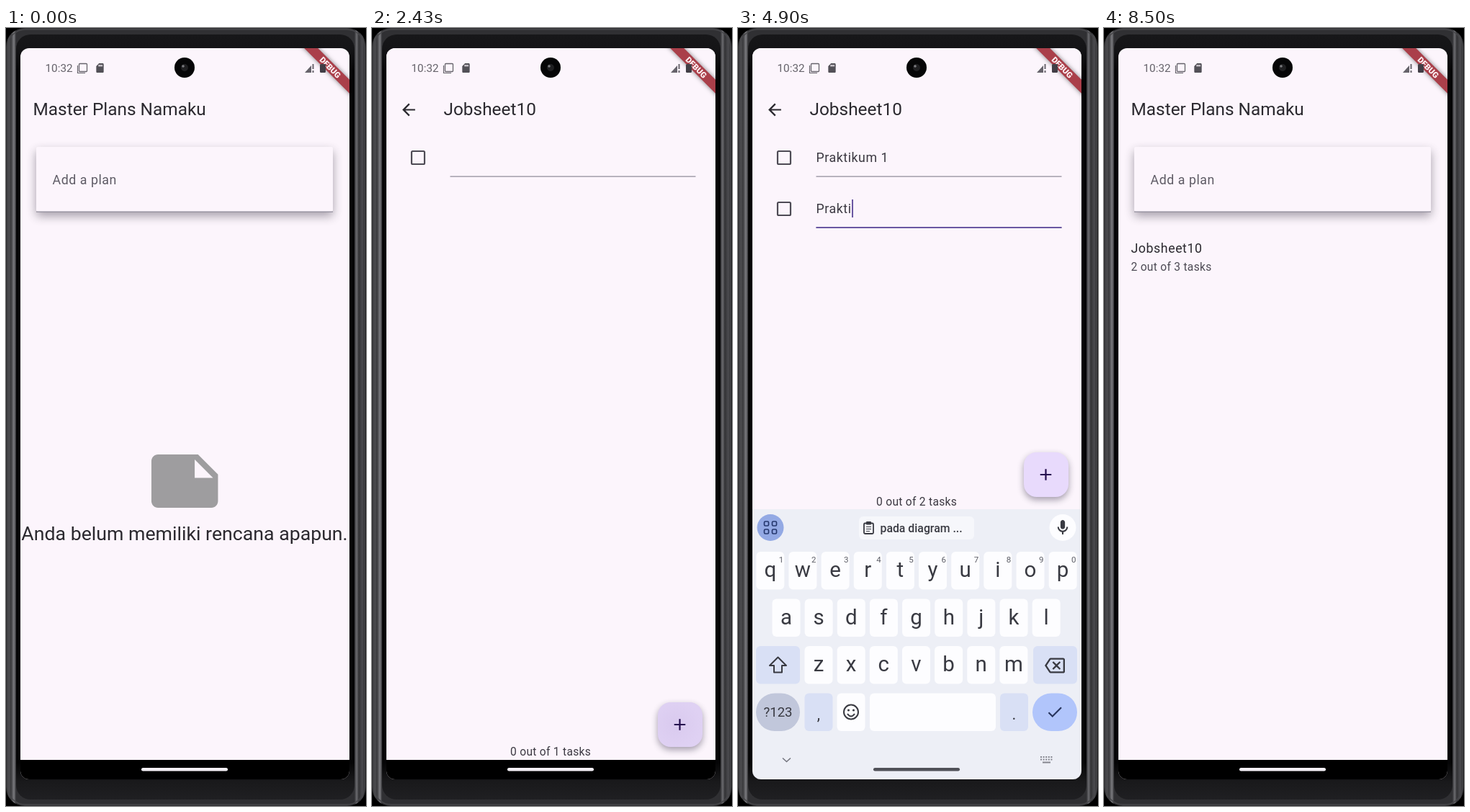
An HTML page with a canvas that plays this animation: 500x1080 px, repeating every 8530 ms.

```html
<!DOCTYPE html>
<html lang="id">
<head>
<meta charset="utf-8">
<title>Master Plans</title>
<style>
html, body { margin: 0; width: 100%; height: 100%; overflow: hidden; background: #000; }
canvas { display: block; }
</style>
</head>
<body>
<canvas id="stage" width="500" height="1080"></canvas>
<script>
const c = document.getElementById('stage').getContext('2d');
const LOOP = 8530, INK = '#2b292f', KEY_INK = '#393a42', BG = '#fcf5fc', PURPLE = '#6a58a2', GREY = '#4e4b55';

// One entry per text entry: keyboard opens, typing starts, ms per letter, focus ends, keyboard closes
const entries = [
  { open: 240, type: 600, step: 68, blur: 1330, close: 1390, text: 'Jobsheet10' },
  { open: 2580, type: 2800, step: 60, blur: 3500, close: 3560, text: 'Praktikum 1' },
  { open: 4330, type: 4540, step: 62, blur: 5290, close: 5350, text: 'Praktikum 2' },
  { open: 6200, type: 6400, step: 58, blur: 7130, close: 7230, text: 'Praktikum 3' }
];
const taskAdded = [2330, 4080, 5930], taskChecked = [7620, 7860];
const PUSH = 1740, BACK = 8130, SLIDE = 130;

const ICON = {
  note: 'M22 10l-6-6H4c-1.1 0-2 .9-2 2v12c0 1.1.9 2 2 2h16c1.1 0 2-.9 2-2v-8zM15 5.5l5.5 5.5H15z',
  back: 'M20 11H7.83l5.59-5.59L12 4l-8 8 8 8 1.41-1.41L7.83 13H20z',
  add: 'M19 13h-6v6h-2v-6H5v-2h6V5h2v6h6z',
  check: 'M9 16.17L4.83 12l-1.42 1.41L9 19 21 7l-1.41-1.41z',
  card: 'M18 2h-8L4 8v12c0 1.1.9 2 2 2h12c1.1 0 2-.9 2-2V4c0-1.1-.9-2-2-2zM9 5h2v4H9zM12 5h2v4h-2zM15 5h2v4h-2z',
  mic: 'M12 14c1.66 0 3-1.34 3-3V5c0-1.66-1.34-3-3-3S9 3.34 9 5v6c0 1.66 1.34 3 3 3zM17 11c0 2.76-2.24 5-5 5s-5-2.24-5-5H5c0 3.53 2.61 6.43 6 6.92V21h2v-3.08c3.39-.49 6-3.39 6-6.92z',
  erase: 'M22 3H7c-.69 0-1.23.35-1.59.88L0 12l5.41 8.11c.36.53.9.89 1.59.89h15c1.1 0 2-.9 2-2V5c0-1.1-.9-2-2-2zm0 16H7.07L2.4 12l4.66-7H22v14zM10.41 17L14 13.41 17.59 17 19 15.59 15.41 12 19 8.41 17.59 7 14 10.59 10.41 7 9 8.41 12.59 12 9 15.59z'
};

const clamp = v => Math.min(1, Math.max(0, v));
const ease = v => 1 - (1 - clamp(v)) ** 3;
const typed = (e, t) => e.text.slice(0, Math.max(0, Math.floor((t - e.type) / e.step) + 1));
const focused = (e, t) => t >= e.open - 30 && t < e.blur;
const count = (times, t) => times.filter(at => t >= at).length;
const progress = t => `${count(taskChecked, t)} out of ${count(taskAdded, t)} tasks`;

function box(x, y, w, h, r, fill) {
  c.beginPath();
  c.roundRect(x, y, w, h, r);
  c.fillStyle = fill;
  c.fill();
}
function disc(x, y, r, fill) {
  box(x - r, y - r, 2 * r, 2 * r, r, fill);
}
function frame(x, y, w, h, r, color, line) {
  c.beginPath();
  c.roundRect(x, y, w, h, r);
  c.strokeStyle = color;
  c.lineWidth = line;
  c.stroke();
}
function lines(d, color, width) {
  c.strokeStyle = color;
  c.lineWidth = width;
  c.stroke(new Path2D(d));
}
function text(s, x, y, size, color = INK, space = 0, align = 'left', weight = 400) {
  c.font = `${weight} ${size}px Roboto, sans-serif`;
  c.letterSpacing = space + 'px';
  c.textAlign = align;
  c.fillStyle = color;
  c.fillText(s, x, y);
  const width = c.measureText(s).width;
  c.letterSpacing = '0px';
  return width;
}
function icon(name, cx, cy, size, color) {
  c.save();
  c.translate(cx - size / 2, cy - size / 2);
  c.scale(size / 24, size / 24);
  c.fillStyle = color;
  c.fill(new Path2D(ICON[name]), 'evenodd');
  c.restore();
}
function shadow(color, blur, dy, draw) {
  c.save();
  c.shadowColor = color;
  c.shadowBlur = blur;
  c.shadowOffsetY = dy;
  draw();
  c.restore();
}
function gradient(x, y, stops) {
  const g = c.createLinearGradient(0, 0, x, y);
  for (const [at, color] of stops) g.addColorStop(at / (x || y), color);
  return g;
}

function body() {
  c.fillStyle = '#000';
  c.fillRect(0, 0, 500, 1080);
  box(0, 0, 500, 1080, 26, gradient(500, 0, [
    [0, '#242426'], [4, '#4e4e51'], [7, '#39393c'], [11, '#7c7c80'], [14, '#303033'],
    [484, '#303033'], [487, '#6c6c70'], [490, '#323235'], [495, '#4c4c50'], [500, '#18181a']]));
  frame(2, 2, 496, 1076, 25, '#47474a', 1.5);
  box(14, 9, 470, 1062, 20, gradient(0, 1080, [
    [0, '#19191b'], [30, '#141416'], [60, '#050506'], [1020, '#050506'], [1046, '#19191b'], [1080, '#222225']]));
}

function cursor(x, y, t, e) {
  if ((t - e.type + 1000) % 340 < 200) {
    c.fillStyle = PURPLE;
    c.fillRect(x, y, 2, 25);
  }
}

function underline(x, y, w, e, t) {
  box(x, y - 1, w, 1.2, 0, '#918d9b');
  c.save();
  c.globalAlpha *= clamp((t - e.open + 30) / 60) * (1 - clamp((t - e.blur) / 110));
  box(x, y - 1.5, w, 2, 0, PURPLE);
  c.restore();
}

function home(t, inset) {
  const e = entries[0], focus = focused(e, t), done = t >= 1310;
  text('Master Plans Namaku', 37.5, 121, 24.4);
  shadow('rgba(40,34,50,.42)', 14, 6, () => box(42, 165, 412, 90, 2, BG));
  underline(42, 255.5, 412, e, t);
  const up = ease((t - e.open + 30) / 80) * (1 - ease((t - e.blur) / 80));
  text('Add a plan', 64.5, 216.5 - 17 * up, 17.8 - 4.45 * up, focus ? '#7b6bae' : '#5d5a64', .55 - .14 * up);
  if (focus) {
    const w = done ? 0 : text(typed(e, t), 64.5, 226, 17.8, INK, .55);
    cursor(65 + w, 207, t, e);
  }
  if (done) {
    if (t > PUSH - 70 && t < PUSH + 200) {
      c.fillStyle = 'rgba(70,60,80,.09)';
      c.fillRect(20, 279, 457, 80);
    }
    text('Jobsheet10', 37.5, 312, 17.8, INK, .55);
    text(progress(t), 37.5, 336.5, 15.6, GREY, .28);
  } else {
    const y = -inset / 2;
    icon('note', 248.2, 629 + y, 111, '#9e9d9f');
    text('Anda belum memiliki rencana apapun.', 248, 711 + y, 26.7, INK, 0, 'center');
  }
}

function plan(t, inset) {
  c.fillStyle = BG;
  c.fillRect(20, 28, 457, 988);
  icon('back', 51, 113.5, 26.7, INK);
  text('Jobsheet10', 99.5, 121, 24.4);
  for (let i = 0; i < count(taskAdded, t); i++) {
    const e = entries[i + 1], y = 71 * i;
    if (t >= taskChecked[i]) {
      box(54, 170 + y, 20, 20, 2, '#6750a4');
      icon('check', 64, 180 + y, 19, BG);
    } else {
      frame(55, 171 + y, 18, 18, 1.5, GREY, 2.2);
    }
    const w = text(typed(e, t), 108.5, 186 + y, 17.8, '#3c3942', .55);
    underline(108.5, 206.5 + y, 341, e, t);
    if (focused(e, t)) cursor(109 + w, 167 + y, t, e);
  }
  text(progress(t), 248, 1010 - inset, 15.6, '#3c3942', .28, 'center');
  fab(t, 936 - inset);
}

function fab(t, y) {
  const tap = taskAdded.find(at => t >= at - 40 && t < at + 200);
  shadow('rgba(40,30,60,.42)', 10, 4, () => box(397, y, 62, 62, 17.8, tap ? '#dfd1f3' : '#e8dafc'));
  if (tap) {
    const p = clamp((t - tap + 40) / 200), g = c.createRadialGradient(422, y + 31, 0, 422, y + 31, 14 + 30 * p);
    g.addColorStop(0, `rgba(195,175,222,${.7 * (1 - p)})`);
    g.addColorStop(1, 'rgba(195,175,222,0)');
    box(397, y, 62, 62, 17.8, g);
  }
  icon('add', 427.5, y + 31, 26.7, '#26104f');
}

function banner() {
  c.save();
  c.translate(477, 28);
  c.rotate(Math.PI / 4);
  shadow('rgba(0,0,0,.5)', 6, 0, () => box(-60, 31, 120, 13.4, 0, '#aa3f4a'));
  text('DEBUG', 0, 41.8, 11.3, '#fff4f6', 0, 'center', 900);
  c.restore();
}

function status() {
  const color = '#66636b';
  text('10:32', 54.5, 61, 15.3, color);
  frame(101.5, 49.5, 11, 11, 1, color, 1.3);
  lines('M99.5 52V62.5H110', color, 1.2);
  icon('card', 130.5, 55.5, 15.5, '#525057');
  c.fillStyle = color;
  c.fill(new Path2D('M415 62L424 52V62ZM425.5 50h2v7h-2ZM425.5 59h2v3h-2Z'));
  box(436, 50, 8, 12, 1.5, '#423e46');
  disc(248, 55, 14, '#060607');
  disc(248, 55, 5, '#1f1f21');
  disc(246, 53, 1.8, '#7c7c80');
}

function key(x, y, w, label, fill = '#fdfdff') {
  box(x, y, w, 52.5, 6, fill);
  if (label) text(label, x + w / 2, y + 35, 29.5, KEY_INK, 0, 'center');
}

function keyboard() {
  c.fillStyle = '#edeff6';
  c.fillRect(20, 668, 457, 376);
  disc(45, 693.5, 18.5, '#93a9e4');
  for (const x of [36.5, 47.5]) for (const y of [685, 696]) frame(x, y, 6, 6, 1.5, '#26386f', 1.7);
  box(168, 678, 160, 32, 6, '#f6f7fb');
  frame(175, 687.5, 13, 14.5, 1.5, KEY_INK, 1.8);
  box(178, 685, 7, 4.5, 1, KEY_INK);
  lines('M178 692.5h7M178 695.5h7M178 698.5h5', KEY_INK, 1.2);
  text('pada diagram ...', 197.5, 699.5, 15.8, KEY_INK, 0, 'left', 500);
  disc(451, 693.5, 18.5, '#fdfdff');
  icon('mic', 451, 693.5, 25, KEY_INK);

  [...'qwertyuiop'].forEach((ch, i) => {
    key(25.3 + 45.15 * i, 727, 39, ch);
    text((i + 1) % 10, 60 + 45.15 * i, 741.5, 11.5, '#5c5d66', 0, 'center');
  });
  [...'asdfghjkl'].forEach((ch, i) => key(47.5 + 45.15 * i, 792.5, 39, ch));
  [...'zxcvbnm'].forEach((ch, i) => key(92.5 + 45.15 * i, 858, 39, ch));

  const side = '#d9e0f5';
  key(25, 858, 61, '', side);
  c.lineJoin = 'round';
  lines('M55.5 873.5L44 885H50V894.5H61V885H67Z', KEY_INK, 2);
  c.lineJoin = 'miter';
  key(410, 858, 61, '', side);
  icon('erase', 440, 885, 28, KEY_INK);

  box(25, 923.5, 61, 52.5, 26, '#c1c7db');
  text('?123', 55.5, 956, 18.6, KEY_INK, 0, 'center');
  key(92.5, 923.5, 39, '', side);
  text(',', 112, 960, 22, KEY_INK, 0, 'center');
  key(137.5, 923.5, 39);
  frame(147, 939.5, 20, 20, 10, KEY_INK, 2);
  disc(153.5, 947, 1.6, KEY_INK);
  disc(160.5, 947, 1.6, KEY_INK);
  lines('M152 952Q157 959 162 952', KEY_INK, 2);
  key(183, 923.5, 175);
  key(364, 923.5, 39, '', side);
  text('.', 383.5, 960, 22, KEY_INK, 0, 'center');
  box(409, 923.5, 62, 52.5, 26, '#b1c5fb');
  icon('check', 440, 949.5, 26, '#29365f');

  lines('M62 1013.5L67.5 1018.5L73 1013.5', '#75767f', 1.6);
  for (let i = 0; i < 5; i++) for (let j = 0; j < 2; j++) box(420 + 3.6 * i, 1011 + 3.5 * j, 2, 2, 0, '#85868f');
  box(423, 1018.5, 11, 2, 0, '#85868f');
}

function draw(t) {
  const open = Math.max(...entries.map(e => ease((t - e.open) / SLIDE) * (1 - ease((t - e.close) / SLIDE))));
  const top = 1043 - 375 * open, inset = Math.max(0, 1015 - top);
  body();
  c.save();
  c.beginPath();
  c.roundRect(20, 28, 457, 1015, 12);
  c.clip();
  c.fillStyle = BG;
  c.fillRect(20, 28, 457, 1015);

  const page = ease((t - PUSH) / 130) * (1 - ease((t - BACK) / 130));
  if (page < 1) home(t, inset);
  if (page > 0) {
    const s = .9 + .1 * page;
    c.save();
    c.globalAlpha = page;
    c.translate(248.5, 522);
    c.scale(s, s);
    c.translate(-248.5, -522);
    plan(t, inset);
    c.restore();
  }
  banner();
  c.fillStyle = '#000';
  c.fillRect(20, 1016, 457, 28);
  if (open > 0) {
    c.save();
    c.translate(0, top - 668);
    keyboard();
    c.restore();
  }
  box(188, 1027, 120, 4.5, 2.2, open > .15 ? '#505158' : '#f4f0f6');
  status();
  c.restore();
}

function tick(now) {
  draw(now % LOOP);
  requestAnimationFrame(tick);
}
draw(0);
requestAnimationFrame(tick);
</script>
</body>
</html>
```
